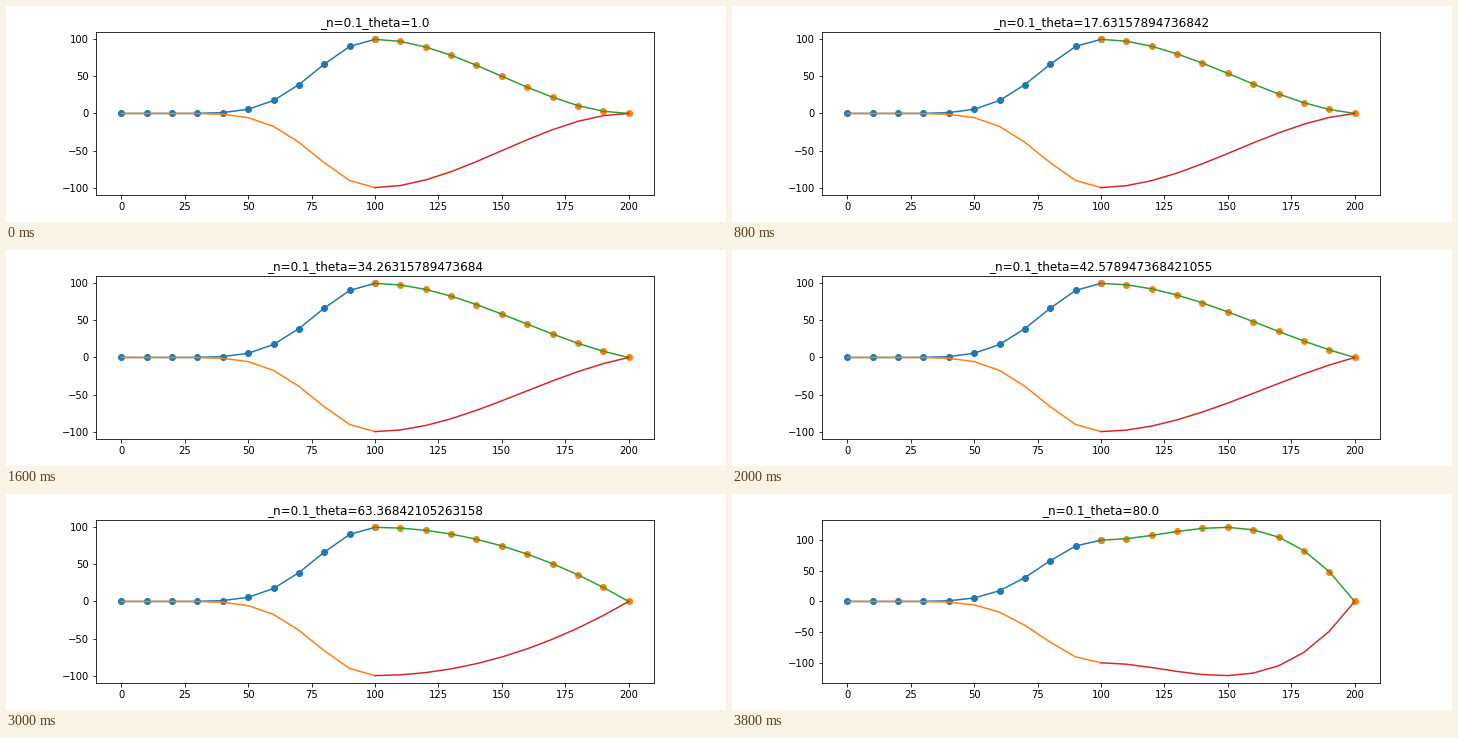
A matplotlib script that plays this animation: 720x216 px, repeating every 4000 ms.

```python
import numpy as np
import matplotlib.pyplot as plt
from matplotlib.animation import FuncAnimation

NOSE, TAIL, DIAMETER = 100, 100, 200
N = 0.1
THETAS = np.linspace(1, 80, 20)

plt.rcParams.update({"font.family": "DejaVu Sans", "font.size": 10})
fig, ax = plt.subplots(figsize=(10, 3), dpi=72)
fig.subplots_adjust(left=0.125, right=0.9, bottom=0.125, top=0.88)

x_nose = np.linspace(0, NOSE, 11)
x_tail = np.linspace(NOSE, NOSE + TAIL, 11)


def nose_radius(x):
    return DIAMETER / 2 * (1 - ((x - NOSE) / NOSE) ** 2) ** (1 / N)


def tail_radius(x, theta):
    s, t = x - NOSE, np.tan(np.radians(theta))
    square = 3 * DIAMETER / (2 * TAIL**2) - t / TAIL
    cube = DIAMETER / TAIL**3 - t / TAIL**2
    return DIAMETER / 2 - square * s**2 + cube * s**3


def draw_profile(x, r):
    ax.scatter(x, r)
    ax.plot(x, r)
    ax.plot(x, -r)


def update(i):
    theta = THETAS[i]
    ax.clear()
    draw_profile(x_nose, nose_radius(x_nose))
    draw_profile(x_tail, tail_radius(x_tail, theta))
    ax.set_title(f"_n={N}_theta={theta}")


anim = FuncAnimation(fig, update, frames=len(THETAS), init_func=lambda: None,
                     interval=200, repeat=True, repeat_delay=0)
plt.show()
```
